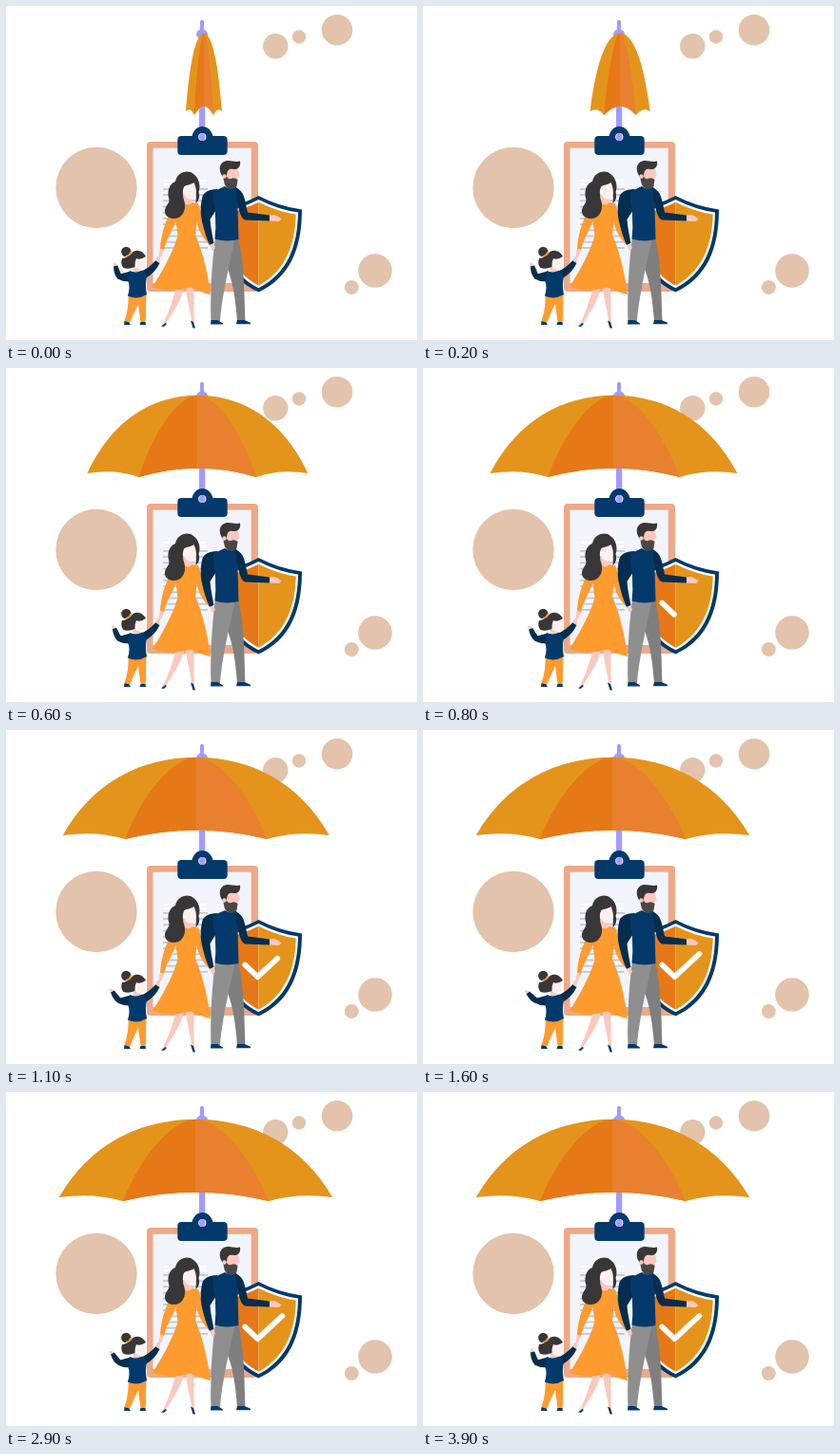
Write an HTML page that moves like this. It is 432 by 352 pixels and loops after 4000 ms.

```html
<!DOCTYPE html>
<html lang="en">
<head>
<meta charset="utf-8">
<title>Family cover</title>
<style>
html, body { margin: 0; width: 100%; height: 100%; overflow: hidden; background: #fff; }
svg { display: block; width: 432px; height: 352px; }
.tan { fill: #e3c3ab; }
.navy { fill: #043a6b; }
.sleeve { fill: #052d4e; }
.dark { fill: #393637; }
.beard { fill: #4a4747; }
.skin { fill: #fbc8bd; }
.pale { fill: #fff0ed; }
.dress { fill: #fd9b2e; }
.amber { fill: #e4941b; }
.rust { fill: #e67817; }
.lilac { fill: #a29bfe; }
.line { fill: none; stroke-linecap: round; stroke-linejoin: round; }
</style>
</head>
<body>
<svg viewBox="0 0 432 352" xmlns="http://www.w3.org/2000/svg">
  <g class="tan">
    <circle cx="95" cy="191.5" r="42.7"/>
    <circle cx="283.3" cy="42.3" r="13.2"/>
    <circle cx="308" cy="32.5" r="7.2"/>
    <circle cx="348" cy="25.2" r="16.3"/>
    <circle cx="388" cy="279" r="17.8"/>
    <circle cx="363.3" cy="296.5" r="7.5"/>
  </g>

  <!-- clipboard -->
  <rect x="148" y="143" width="117" height="158" rx="4" fill="#eda988"/>
  <rect x="154.5" y="149.7" width="103.2" height="142.3" fill="#f2f4fb"/>
  <g id="rows"></g>

  <!-- umbrella -->
  <path class="lilac" d="M203 30H209.3V137H203ZM204 16Q206 13.5 208 16V26H204ZM200 31Q200 24.5 206 24.5T212.3 31L209 34H203Z"/>
  <g id="canopy">
    <path class="amber" d="M-153.5 111C-122 56 -70 28.7 -9.8 28.7S102.4 56 133.9 111Q98 106 66.7 115Q-9.8 96.5 -86.3 115Q-117 106 -153.5 111Z"/>
    <path class="rust" d="M-9.8 28.7C-36 30 -67 67 -86.3 115Q-48 105.75 -9.8 105.75Z"/>
    <path fill="#e88030" d="M-9.8 28.7C16.4 30 47.4 67 66.7 115Q28.4 105.75 -9.8 105.75Z"/>
  </g>

  <path class="navy" d="M184.5 137H195.5C197 131 201 127 206.3 127S216 131 217.5 137H228.5Q232.7 137 232.7 141V153Q232.7 157 228.5 157H184.5Q180.3 157 180.3 153V141Q180.3 137 184.5 137Z"/>
  <circle cx="206.3" cy="138" r="4.1" fill="#fff"/>
  <ellipse class="lilac" cx="206.2" cy="138" rx="3.2" ry="4"/>

  <!-- shield -->
  <path class="navy" d="M265.5 200Q286 211 311 214.5C311 255 299 286 265.5 301.5C232 286 220 255 220 214.5Q245 211 265.5 200Z"/>
  <path fill="#fff" d="M265.5 204Q286 214.500 307 217.600C306.500 254 295.500 282 265.500 297.300C235.500 282 224.500 254 224 217.600Q245 214.500 265.500 204Z"/>
  <path class="rust" d="M265.500 206.700Q246 216.500 226.300 219.600C227 253 238 280 265.500 294.700Z"/>
  <path class="amber" d="M265.500 206.700Q285 216.500 304.700 219.600C304 253 293 280 265.500 294.700Z"/>
  <path id="check" class="line" pathLength="1" stroke="#fff" stroke-width="5.800" d="M251.300 247.500L264.500 260.200L290.400 236"/>

  <!-- woman -->
  <path class="skin" d="M179 297H187C184 312 174 324 167.500 336L165 334.500C172 322 175 309 179 297ZM189 297H197C198 310 197 322 198 334L195.500 335C194 321 190 309 189 297Z"/>
  <path class="navy" d="M167.500 334L169 335L166 338L163 337.500ZM194 331.500L197 333L199 339.500H196.500Z"/>
  <path class="skin" d="M187 198H195L196.500 210L191 214L185 209Z"/>
  <path class="dress" d="M180 209L187 207Q191 212 196 207L202 208C205 216 208 232 216 249L213 251C206 243 202 236 200.500 227L199 241C206 257 212 280 215 304Q205 302 194 296.500Q173 303 154 296C164 280 175 261 180.500 242L178.500 227C174 238 169 245 166 257L162 256C162.500 242 168 225 174 215Z"/>
  <path class="pale" d="M185.500 188L198 184Q202 194 198.500 201Q195.500 205 191 203Q186 200 185.500 188Z"/>
  <path class="dark" d="M178 185C180 175 191 172 197 177C203 181 205 190 202.500 196C204 201 203 205 199.500 208C200 200 201 193 197.500 186C194 189 190 188 187.500 190C185 194 186 198 186.500 203C189 209 188.500 216 185 220C181 226 170 225 167.500 219C165 212 172 209 171.500 204C169 196 171 188 178 185Z"/>
  <path class="skin" d="M161.800 256L166 257L163.500 264L160 266Z"/>

  <!-- man -->
  <path class="skin" d="M275 220.500L282 220Q287 221.500 289.500 224.500L287 227L276 226.500Z"/>
  <path fill="#7f7f7f" d="M227 244H243.800C250 266 250.500 300 251.500 332H243C241 306 238 288 231 272Z"/>
  <path fill="#8f8f8f" d="M220 244H241C237 264 228 298 225 332H215.500C214.500 300 217 266 220 244Z"/>
  <path class="navy" d="M215.500 331H222.500L228 334.500V335.500H215ZM243 331H250.500L257 333.800V335.300H242Z"/>
  <path class="sleeve" d="M222 193C213 193.500 207 196 206 203C204 212 204.500 220 206 227C208 236 210.500 244 214 252L218.500 250C217 242 215 233 214.500 225L222 213Z"/>
  <path class="skin" d="M231 182H241V194Q236 198 231 193Z"/>
  <path class="navy" d="M218 195Q224 193 230 190Q236 194.500 241 190L245 194L243.500 210L244.500 246Q232 249 219.500 245.500Q222 222 218 207Z"/>
  <path class="sleeve" d="M241.500 192C248 193.500 250 200 251.500 206L254 217.500L277 220.500V226.500L251 225.500C246 223 245 214 242.500 206Z"/>
  <path class="skin" d="M214 252L218.500 250L220 255L217 258Z"/>
  <path class="skin" d="M230 169H243.500L245.500 179L243.500 181V186H231Z"/>
  <path class="beard" d="M228.500 178L231.500 178.500Q233 183 236.500 182Q240 180 243.500 183L242.500 190Q239.500 194 234.500 192.500Q228 190 228.500 178Z"/>
  <path class="dark" d="M226.500 178C223 171 225 165 230.500 163.500C235 162 241 165 246 163.500C247 169 244 172.500 239 172C235 171.500 232.500 172 232 179L228.500 181Z"/>
  <circle class="skin" cx="229.500" cy="179.500" r="2.200"/>

  <!-- girl -->
  <path class="dress" d="M128.500 303H148C146 314 148 324 146.500 333H141.500L139 314Q134 324 130 334L124.500 332C128 322 129 313 128.500 303Z"/>
  <path class="navy" d="M124.500 332L129.500 333.500L131 336H124ZM141.500 333H146.500L147 336H140.500Z"/>
  <g id="wave">
    <path class="skin" d="M113 275L112.500 270.500L115.500 271L117.500 275Z"/>
    <path class="sleeve" d="M113 274.500L117.300 273.500L121.500 284Q121.500 288.500 117.500 287.500Q113.500 284 113 274.500Z"/>
  </g>
  <path class="sleeve" d="M118 283L131 279.500L131 290Q123 291 117.500 287.500ZM142 279.500Q150 276.500 157.500 268L161.500 271Q157 281 146.500 287Z"/>
  <path class="skin" d="M157.500 268.500L159 264L162 265L161.500 271Z"/>
  <path class="skin" d="M134 273H141V280Q137 282 133.500 279Z"/>
  <path class="navy" d="M130 279Q137 282 143 278.500L148 285Q146 295 148 304Q138 310 128 305.500Q131 296 128 289Z"/>
  <path class="pale" d="M132.500 266L145.500 262C149 270 146.500 277.500 140.500 278Q134 277 132.500 266Z"/>
  <path class="dark" d="M131 262C134 256 143 256 147 264Q141 268 137 266Q135 270 135.500 275Q129 278 123.500 276Q120 272 122 266Q126 266 131 262Z"/>
  <circle class="dark" cx="126.300" cy="259" r="5.200"/>
  <path class="line" stroke="#fd9b2e" stroke-width="1.600" d="M126.500 263.500Q130 263 131 259.500"/>
</svg>
<script>
const LOOP = 4000, STEP = 100;
const get = id => document.getElementById(id);
const canopy = get('canopy'), check = get('check'), wave = get('wave');

const row = (x, y, w, color) =>
  `<rect x="${x}" y="${y}" width="${w}" height="1.8" fill="${color}"/>`;
let rows = row(166, 183, 45, '#fff') + row(166, 187, 45, '#fff');
for (let i = 0; i < 11; i++) rows += row(165, 192 + i * 6.2, i % 4 === 3 ? 42 : 47, '#bdc9df');
get('rows').innerHTML = rows;

const clamp = v => Math.min(1, Math.max(0, v));

// cubic-bezier(.33, 0, 0, 1)
function ease(v) {
  const x = clamp(v);
  const curve = (s, a, b) => 3 * s * (1 - s) ** 2 * a + 3 * s * s * (1 - s) * b + s ** 3;
  let lo = 0, hi = 1;
  for (let i = 0; i < 24; i++) {
    const mid = (lo + hi) / 2;
    if (curve(mid, .33, 0) < x) lo = mid; else hi = mid;
  }
  return curve(lo, 0, 1);
}

function draw(ms) {
  const t = Math.floor((ms % LOOP) / STEP) * STEP;

  const spread = (19 + 125 * ease(t / 1500)) / 144;
  canopy.setAttribute('transform', `translate(209.3 0) scale(${spread} 1)`);

  const drawn = ease((t - 600) / 1000);
  check.setAttribute('visibility', drawn > 0 ? 'visible' : 'hidden');
  check.setAttribute('stroke-dasharray', `${drawn} 2`);

  const turn = -15 * (1 - Math.cos(2 * Math.PI * t / LOOP));
  wave.setAttribute('transform', `rotate(${turn} 119 285.5)`);
}

const start = performance.now();
function tick() {
  draw(performance.now() - start);
  requestAnimationFrame(tick);
}
tick();
</script>
</body>
</html>
```
